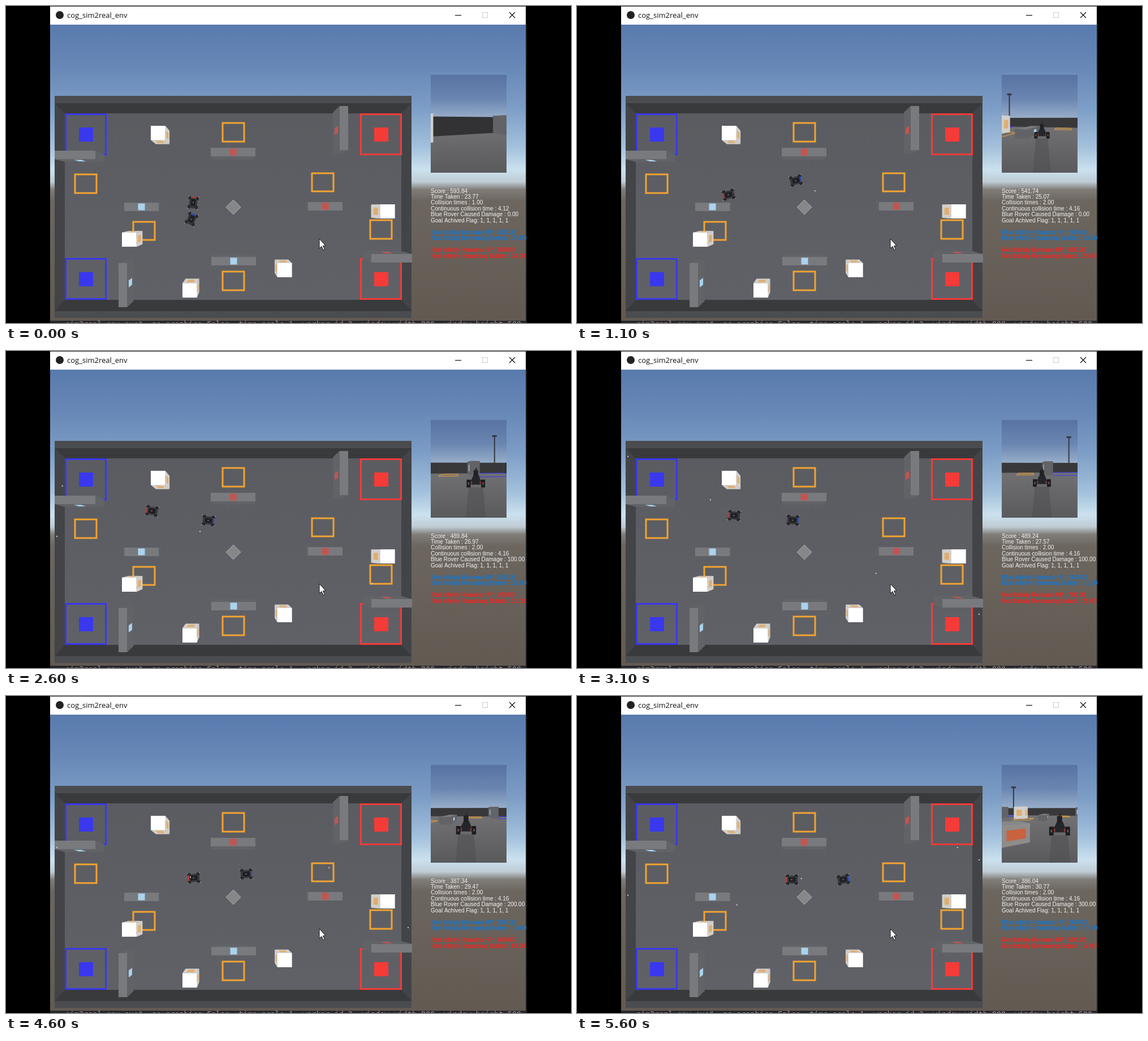
An HTML page with a canvas that plays this animation: 999 by 561 pixels, repeating every 5700 ms.

```html
<!DOCTYPE html>
<html lang="en">
<head>
<meta charset="utf-8">
<title>cog_sim2real_env</title>
<style>
html, body { margin: 0; width: 100%; height: 100%; overflow: hidden; background: #000; }
canvas { display: block; }
</style>
</head>
<body>
<canvas id="stage" width="999" height="561"></canvas>
<script>
const c = document.getElementById('stage').getContext('2d');
const LOOP = 5700, STEP = 100;
const CX = 402, CY = 355;              // arena centre
const LIFT = .0026;                    // growth of the top view per unit of height
const EYE = 21, FOCUS = 200, VX = 818, VY = 200;   // rover camera
const BLUE = '#3938ee', RED = '#f43b38', ORANGE = '#f2a331', SKY = '#a9d3ee', ROSE = '#c25551';

// Way points: time, clock in tenths, blue x, y, angle, red x, y
const PATH = [
  [0, 0, 328, 377, -67, 331, 348],
  [1100, 13, 387, 309, -13, 268, 334],
  [1600, 21, 348, 308, 0, 246, 297],
  [2600, 32, 358, 300, 6, 258, 283],
  [3700, 46, 412, 302, -1, 305, 306],
  [4600, 57, 425, 315, -3, 332, 322],
  [5600, 70, 471, 325, -10, 380, 325]
];

// Smooth curve through the way points
function pose(t) {
  const last = PATH.length - 1;
  let i = 0;
  while (i < last - 1 && t >= PATH[i + 1][0]) i++;
  const a = PATH[i], b = PATH[i + 1], before = PATH[Math.max(i - 1, 0)], after = PATH[Math.min(i + 2, last)];
  const span = b[0] - a[0], k = (t - a[0]) / span;
  const [, clock, bx, by, angle, rx, ry] = a.map((v, j) => {
    const m = (b[j] - before[j]) / (b[0] - before[0]) * span;
    const n = (after[j] - v) / (after[0] - a[0]) * span;
    const d = b[j] - v;
    return v + k * (m + k * (3 * d - 2 * m - n + k * (m + n - 2 * d)));
  });
  return { clock, bx, by, rx, ry, blueTurn: angle * Math.PI / 180, redTurn: Math.atan2(by - ry, bx - rx) };
}

function rect(x, y, w, h, fill) { c.fillStyle = fill; c.fillRect(x, y, w, h); }
function trace(points) {
  c.beginPath();
  for (const [x, y] of points) c.lineTo(x, y);
}
function poly(points, fill) { trace(points); c.closePath(); c.fillStyle = fill; c.fill(); }
function line(points, color, width) { trace(points); c.strokeStyle = color; c.lineWidth = width; c.stroke(); }
function text(s, x, y, fill, font) { c.fillStyle = fill; c.font = font; c.fillText(s, x, y); }
function fade(y0, y1, stops) {
  const g = c.createLinearGradient(0, y0, 0, y1);
  for (const [y, color] of stops) g.addColorStop((y - y0) / (y1 - y0), color);
  return g;
}
function clipped(x, y, w, h, draw) {
  c.save();
  c.beginPath();
  c.rect(x, y, w, h);
  c.clip();
  draw();
  c.restore();
}
const corners = (x, y, w, h) => [[x, y], [x + w, y], [x + w, y + h], [x, y + h]];
const mix = (p, q, k) => p.map((v, i) => v + (q[i] - v) * k);
const mirror = (x, y, w, h) => [2 * CX - x - w, 2 * CY - y - h, w, h];

// A solid is given by its top face as seen from above
function solid(points, height, top, side, badge, badgeOnTop) {
  const k = 1 + LIFT * height;
  const base = points.map(([x, y]) => [CX + (x - CX) / k, CY + (y - CY) / k]);
  const roof = base.map(p => [...p, height]);
  const sides = base.map((p, i) => {
    const q = base[(i + 1) % 4];
    const length = Math.hypot(q[0] - p[0], q[1] - p[1]);
    const spot = (u, v) => [...mix(p, q, .5 + u * 6 / length), v * height];
    return {
      points: [[...p, 0], [...q, 0], [...q, height], [...p, height]], fill: side,
      mark: length > 16 && [spot(-1, .25), spot(1, .25), spot(1, .75), spot(-1, .75)], badge
    };
  });
  return { roof, sides, top, badge, badgeOnTop };
}

const SOLIDS = [], RINGS = [];
for (const [x, y, w, h, height, onTop, badge, other] of [
  [362, 251, 79, 15, 26, true, ROSE, SKY],
  [209, 348, 61, 15, 10, true, SKY, ROSE],
  [590, 177, 15, 78, 26, false, ROSE, SKY],
  [86, 256, 72, 15, 26, false, SKY, ROSE]
]) {
  SOLIDS.push(solid(corners(x, y, w, h), height, '#797a7e', '#626367', badge, onTop));
  SOLIDS.push(solid(corners(...mirror(x, y, w, h)), height, '#797a7e', '#626367', other, onTop));
}
for (const [x, y] of [[256, 212], [205, 401], [662, 351], [480, 455], [312, 491]])
  SOLIDS.push(solid(corners(x, y, 25.5, 25), 26, '#fff', '#d2cfcb', '#dfae70'));
SOLIDS.push(solid([[CX, 343], [415, 356], [CX, 369], [389, 356]], 12, '#868789', '#8f8c89', '#c9633f'));

for (const [x, y, w, h, color, other] of [
  [383, 207, 38, 33, ORANGE, ORANGE], [541, 296, 38, 32, ORANGE, ORANGE], [122, 298, 38, 33, ORANGE, ORANGE],
  [105.5, 191.5, 71, 71, BLUE, RED], [627.5, 191.5, 71, 71, RED, BLUE]
]) RINGS.push([x, y, w, h, color], [...mirror(x, y, w, h), other]);

function drawWindow() {
  rect(0, 0, 999, 561, '#000');
  rect(78, 0, 842, 1, '#292929');
  rect(78, 1, 841, 32, '#fff');
  rect(78, 33, 841, 524, fade(33, 557, [[33, '#587aad'], [110, '#6888b7'], [180, '#7c9dc6'], [250, '#a3c1dc'],
    [290, '#cbe1ee'], [311, '#bfccd4'], [325, '#807c78'], [345, '#6c665f'], [557, '#625a52']]));
  rect(919, 33, 2, 528, '#202020');
  c.fillStyle = '#222';
  c.beginPath();
  c.arc(95, 16, 7, 0, 7);
  c.fill();
  text('cog_sim2real_env', 108, 21, '#111', '13px "Open Sans", sans-serif');
  line([[794, 16.5], [805, 16.5]], '#111', 1.2);
  c.strokeStyle = '#ccc';
  c.lineWidth = 1;
  c.strokeRect(842.5, 11.5, 9, 9);
  line([[890, 11], [900, 21]], '#111', 1.2);
  line([[900, 11], [890, 21]], '#111', 1.2);
  clipped(78, 557, 842, 4, () => {
    rect(78, 557, 842, 4, '#25262b');
    text('sim2real_env.exe", no_graphics=False, time_scale=1, worker_id=2, window_width=800, window_height=500',
      105, 568, '#a08f96', '13.4px "DejaVu Sans Mono", monospace');
  });
}

function fromAbove([x, y, z]) {
  const k = 1 + LIFT * z;
  return [CX + (x - CX) * k, CY + (y - CY) * k];
}
const middle = points => [0, 1].map(i => points.reduce((sum, p) => sum + p[i], 0) / points.length);
const farFirst = (x, y, points) => (a, b) => {
  const far = f => { const m = middle(points(f)); return Math.hypot(m[0] - x, m[1] - y); };
  return far(b) - far(a);
};

function drawArena() {
  rect(86, 159, 631, 393, '#4b4c4f');
  rect(86, 172, 631, 368, '#393a3c');
  poly([[86, 172], [104, 190], [104, 520], [86, 540]], '#434447');
  poly([[717, 172], [699, 190], [699, 520], [717, 540]], '#434447');
  rect(104, 190, 595, 330, fade(190, 520, [[190, '#5b5c61'], [520, '#606167']]));
  for (const [x, y, w, h, color] of RINGS) {
    c.strokeStyle = color;
    c.lineWidth = 3;
    c.strokeRect(x, y, w, h);
    if (w > 60) rect(x + w / 2 - 12, y + h / 2 - 12, 25, 25, color);
  }
  for (const s of SOLIDS) {
    for (const f of [...s.sides].sort(farFirst(CX, CY, f => f.points))) {
      poly(f.points.map(fromAbove), f.fill);
      if (f.mark && !s.badgeOnTop) poly(f.mark.map(fromAbove), f.badge);
    }
    const roof = s.roof.map(fromAbove);
    poly(roof, s.top);
    if (s.badgeOnTop) {
      const [x, y] = middle(roof);
      rect(x - 6, y - 6, 12, 12, s.badge);
    }
  }
  const diamond = SOLIDS[SOLIDS.length - 1].roof.map(fromAbove);
  line([...diamond, diamond[0]], '#aaa9a5', 1);
}

function drawRover(x, y, turn, color, end) {
  c.save();
  c.translate(x, y);
  c.rotate(turn);
  rect(-10, -7, 20, 14, '#36373c');
  for (const sx of [-1, 1]) for (const sy of [-1, 1]) {
    rect(sx * 8 - 3, sy * 7 - 2, 6, 4, '#26272a');
    rect(sx * 11 - .7, sy * 8.5 - .7, 1.4, 1.4, '#b5b5b5');
    rect(sx * 4 - .5, sy * 8 - .5, 1, 1, '#8a8a8a');
  }
  rect(-6, -4, 12, 8, '#1e1f23');
  rect(-2, -1, 3, 2, '#5c5f65');
  rect(end * 9 - 1, -5, 2, 10, color);
  c.restore();
}

// The rovers fire at each other in turn; a shot stops at the side walls
function drawShots(t) {
  for (let s = 400, i = 0; s <= t; s += 400, i++) {
    const age = t - s, p = pose(s);
    if (age > 1600) continue;
    const spread = Math.sin(i * 12.9) * .2;
    const aim = (i % 2 ? p.redTurn : p.blueTurn + Math.PI) + spread;
    const [x, y] = i % 2 ? [p.rx, p.ry] : [p.bx, p.by];
    const reach = 16 + age * .4;
    rect(Math.max(89, Math.min(710, x + Math.cos(aim) * reach)), y + Math.sin(aim) * reach, 2, 2, '#d0d0d0');
  }
}

function drawCursor() {
  const arrow = [[554, 412], [554, 429], [558, 425.5], [561, 432], [563.5, 431], [560.5, 424.5], [565, 424]];
  poly(arrow, '#fff');
  line([...arrow, arrow[0]], '#111', 1);
}

// What the blue rover sees: the same arena in perspective
function drawCamera(p) {
  const cos = -Math.cos(p.blueTurn), sin = -Math.sin(p.blueTurn), near = 5;
  const local = ([x, y, z]) => {
    const dx = x - p.bx, dy = y - p.by;
    return [dy * cos - dx * sin, dx * cos + dy * sin, z];
  };
  const project = ([side, depth, z]) => [VX + FOCUS * side / depth, VY + FOCUS * (EYE - z) / depth];
  const see = points => {
    const out = [], q = points.map(local);
    q.forEach((a, i) => {
      const b = q[(i + 1) % q.length];
      if (a[1] >= near) out.push(a);
      if ((a[1] >= near) !== (b[1] >= near)) out.push(mix(a, b, (near - a[1]) / (b[1] - a[1])));
    });
    return out.map(project);
  };

  rect(751, 122, 134, 173, fade(122, 200, [[122, '#5872a2'], [165, '#6b86b1'], [200, '#9ab0ca']]));
  for (const y of [CY - 210, CY + 210]) {
    const post = see([[-95, y, 0], [-95, y, 140]]);
    if (post.length < 2) continue;
    line(post.slice(0, 2), '#343840', 2);
    rect(post[1][0] - 4, post[1][1], 8, 3, '#343840');
  }
  rect(751, 200, 134, 95, fade(200, 295, [[200, '#747477'], [235, '#6b6b6e'], [295, '#5a5a5d']]));
  const floor = corners(104, 190, 595, 330);
  floor.forEach((a, i) => {
    const b = floor[(i + 1) % 4];
    poly(see([[...a, 0], [...b, 0], [...b, 24], [...a, 24]]), i % 2 ? '#38383a' : '#323234');
  });
  for (const [x, y, w, h, color] of RINGS) {
    const q = see(corners(x, y, w, h).map(v => [...v, 0]));
    if (q.length) line([...q, q[0]], color, 1);
  }

  const faces = SOLIDS.flatMap(s => [{ points: s.roof, fill: s.top }, ...s.sides]);
  faces.push({ points: [[p.rx, p.ry, 0]], rover: true });
  for (const f of faces.sort(farFirst(p.bx, p.by, f => f.points))) {
    if (f.rover) {
      const q = local(f.points[0]);
      if (q[1] > 10) drawRoverAhead(...project(q), 100 / q[1]);
    } else {
      poly(see(f.points), f.fill);
      if (f.mark) poly(see(f.mark), f.badge);
    }
  }
}

function drawRoverAhead(x, foot, s) {
  c.save();
  c.translate(x, foot);
  c.scale(s, s);
  poly([[-13, 0], [13, 0], [20, 80], [-20, 80]], '#4f4f5288');
  rect(-13, -13, 26, 8, '#25262b');
  for (const side of [-1, 1]) {
    rect(side * 13 - 3.5, -14, 7, 14, '#1c1d20');
    rect(side * 13 - 1, -9, 2, 4, '#67686c');
    rect(side * 8 - 1, -11, 2, 5, '#9c3936');
  }
  poly([[-9, -12], [-4, -22], [5, -22], [9, -12]], '#25262b');
  rect(-4, -31, 8, 11, '#202126');
  rect(-1, -35, 3, 6, '#2a2b30');
  c.restore();
}

function drawReadout(t, clock) {
  const font = '10px "Liberation Sans", Arial, sans-serif';
  const time = 23.77 + Math.round(clock) / 10;
  const touched = t >= 600;
  const loss = touched * 50.8 + (t >= 1400) * 50 + (t >= 3200) * 100;
  const hits = (t >= 2100) + (t >= 4200) + (t >= 5100);
  [
    'Score : ' + (617.61 - time - loss).toFixed(2),
    'Time Taken : ' + time.toFixed(2),
    'Collision times : ' + (touched ? '2.00' : '1.00'),
    'Continuous collision time : ' + (touched ? '4.16' : '4.12'),
    'Blue Rover Caused Damage : ' + (hits * 100).toFixed(2),
    'Goal Achived Flag: 1, 1, 1, 1, 1'
  ].forEach((s, i) => text(s, 751, 330.5 + i * 10.45, '#f2f2f2', font));

  const rounds = 24 - Math.floor(t / 800);
  clipped(751, 390, 169, 60, () => {
    for (const [name, y, color, hp] of [['Blue', 403.5, '#1c74c4', 800], ['Red', 435, '#e62b27', 800 - hits * 100]])
      for (const shift of [0, .8]) {
        text(name + ' Infinity Remains HP : ' + hp.toFixed(2), 751 + shift, y, color, font);
        text(name + ' Infinity Remaining Bullets : ' + rounds.toFixed(2), 751 + shift, y + 10.5, color, font);
      }
  });
}

function draw(now) {
  const t = Math.floor(now % LOOP / STEP) * STEP;
  const p = pose(t);
  drawWindow();
  drawArena();
  drawRover(p.rx, p.ry, p.redTurn, '#c23a34', -1);
  drawRover(p.bx, p.by, p.blueTurn, '#3050d0', 1);
  drawShots(t);
  drawCursor();
  clipped(751, 122, 134, 173, () => drawCamera(p));
  drawReadout(t, p.clock);
}

const start = performance.now();
function tick() {
  draw(performance.now() - start);
  requestAnimationFrame(tick);
}
tick();
</script>
</body>
</html>
```
